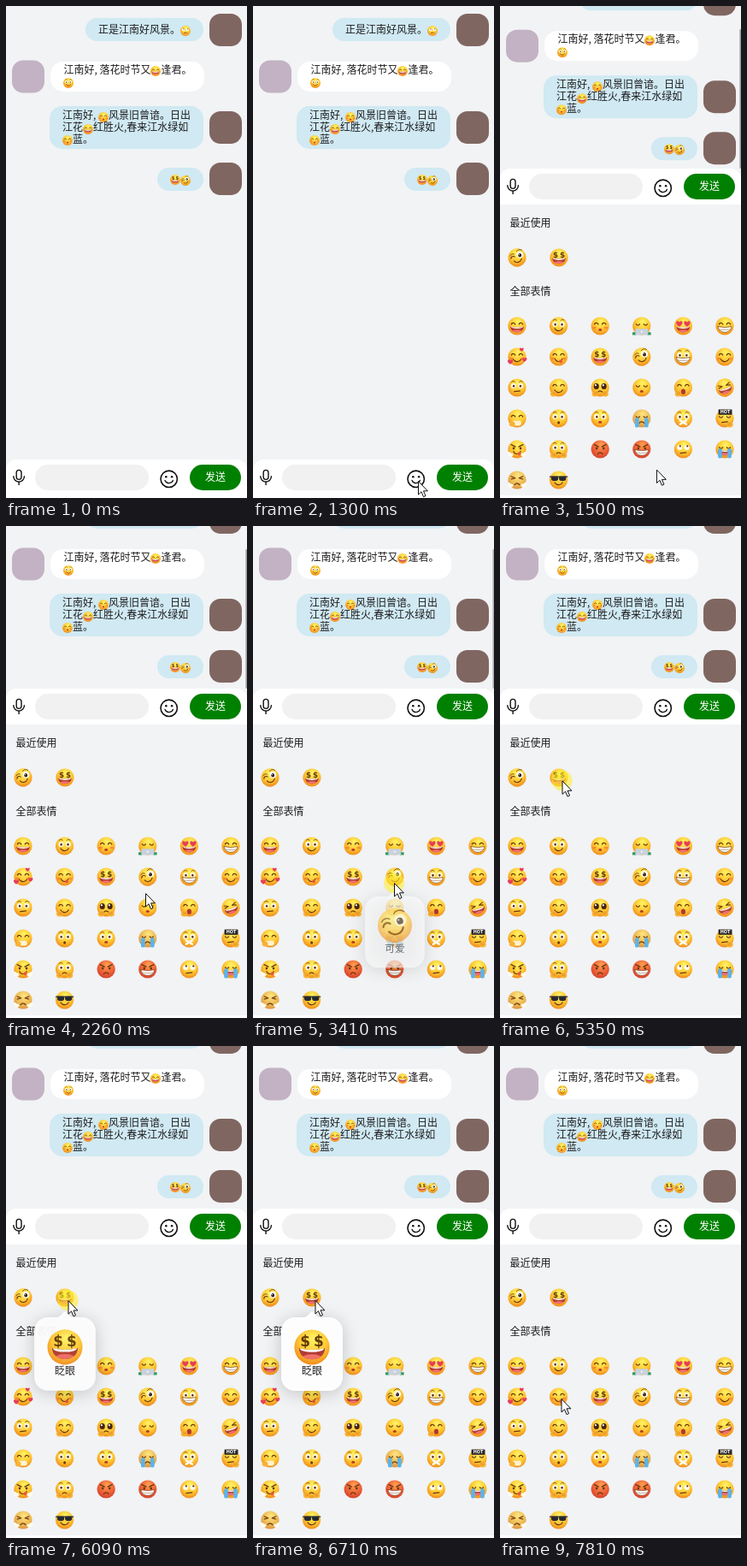
Recreate the animation shown at these times as an HTML page with a canvas. Size 282 by 575 pixels, loop 8 s.

```html
<!DOCTYPE html>
<html lang="zh-CN">
<head>
<meta charset="utf-8">
<title>Chat emoji panel</title>
<style>
html, body { margin: 0; width: 100%; height: 100%; overflow: hidden; background: #f1f3f5; }
canvas { display: block; width: 282px; height: 575px; }
</style>
</head>
<body>
<canvas id="stage"></canvas>
<script>
const W = 282, H = 575, LOOP = 8000, TAU = Math.PI * 2;
const FONT = '"Noto Sans CJK SC", "Noto Sans CJK", "Noto Sans", sans-serif';
const BG = '#f1f3f5', BLUE = '#d0e9f3', INK = '#69350f';
const canvas = document.getElementById('stage');
const ctx = canvas.getContext('2d');
const dpr = Math.max(1, window.devicePixelRatio || 1);
canvas.width = W * dpr;
canvas.height = H * dpr;

const clamp = v => Math.min(1, Math.max(0, v));
const ramp = (t, a, b) => clamp((t - a) / (b - a));
const smooth = p => p * p * (3 - 2 * p);
const easeOut = p => 1 - (1 - p) ** 3;

// ---------- primitives ----------
function box(x, y, w, h, r, fill) {
  ctx.beginPath();
  ctx.roundRect(x, y, w, h, r);
  ctx.fillStyle = fill;
  ctx.fill();
}
function oval(x, y, rx, ry, fill) {
  ctx.beginPath();
  ctx.ellipse(x, y, rx, ry, 0, 0, TAU);
  ctx.fillStyle = fill;
  ctx.fill();
}
function line(points, width, color = INK) {
  ctx.beginPath();
  points.forEach(([x, y]) => ctx.lineTo(x, y));
  ctx.lineWidth = width;
  ctx.strokeStyle = color;
  ctx.stroke();
}
function arc(x, y, r, from, to, width, color = INK) {
  ctx.beginPath();
  ctx.arc(x, y, r, from * Math.PI, to * Math.PI);
  ctx.lineWidth = width;
  ctx.strokeStyle = color;
  ctx.stroke();
}
function text(s, x, mid, color = '#1d1d1f', align = 'left') {
  ctx.font = '12px ' + FONT;
  ctx.textAlign = align;
  ctx.textBaseline = 'alphabetic';
  ctx.fillStyle = color;
  ctx.fillText(s, x, mid + 4);
}
function heart(x, y, s) {
  ctx.beginPath();
  ctx.moveTo(x, y + s);
  ctx.bezierCurveTo(x - s * 1.9, y - s * .2, x - s * .8, y - s * 1.5, x, y - s * .5);
  ctx.bezierCurveTo(x + s * .8, y - s * 1.5, x + s * 1.9, y - s * .2, x, y + s);
  ctx.fillStyle = '#e63e58';
  ctx.fill();
}
const both = draw => [-1, 1].forEach(draw);

// ---------- emoji, drawn in a unit circle ----------
const SKINS = {
  y: ['#fff060', '#fdc531', '#f08a1c'],
  r: ['#ff9a50', '#ec6238', '#d4442c'],
  p: ['#fbe27c', '#eebb55', '#dd9440']
};

const eyes = {
  o: () => both(s => oval(s * .36, -.2, .12, .17, INK)),
  O: () => both(s => {
    oval(s * .4, -.2, .27, .28, '#fff');
    oval(s * .37, -.17, .12, .14, INK);
    arc(s * .42, -.48, .24, 1.2, 1.8, .07);
  }),
  Q: () => both(s => {
    oval(s * .42, -.15, .29, .33, '#4a2410');
    oval(s * .42 - .08, -.27, .1, .1, '#fff');
  }),
  u: () => both(s => {
    oval(s * .4, -.2, .28, .28, '#fff');
    oval(s * .4 + .06, -.34, .11, .11, INK);
  }),
  '^': () => both(s => arc(s * .42, -.12, .22, 1.1, 1.9, .12)),
  x: () => both(s => line([[s * .65, -.4], [s * .22, -.22], [s * .65, -.1]], .11)),
  '-': () => both(s => arc(s * .42, -.32, .22, .15, .85, .11)),
  v: () => both(s => {
    line([[s * .65, -.5], [s * .18, -.28]], .13);
    oval(s * .38, -.1, .12, .14, INK);
  }),
  w: () => {
    arc(-.44, -.02, .25, 1.1, 1.8, .11);
    arc(-.42, -.22, .32, 1.2, 1.75, .07);
    oval(.4, -.2, .36, .36, '#fff');
    oval(.36, -.16, .19, .2, '#2c1a12');
    oval(.3, -.24, .06, .06, '#fff');
    arc(.42, -.38, .4, 1.25, 1.8, .07);
  },
  h: () => both(s => heart(s * .43, -.25, .33)),
  $: () => {
    ctx.font = 'bold .82px "DejaVu Sans", sans-serif';
    ctx.textAlign = 'center';
    ctx.fillStyle = '#633b08';
    both(s => ctx.fillText('$', s * .38, -.04));
  },
  g: () => {
    both(s => box(s * .43 - .39, -.4, .78, .5, [.1, .1, .28, .28], '#262a30'));
    line([[-.95, -.36], [.95, -.36]], .12, '#262a30');
  }
};

function openMouth(teethOnly) {
  ctx.beginPath();
  ctx.moveTo(-.74, .06);
  ctx.quadraticCurveTo(0, .24, .74, .06);
  ctx.bezierCurveTo(.7, .9, -.7, .9, -.74, .06);
  ctx.fillStyle = teethOnly ? '#fff' : '#b23c34';
  ctx.fill();
  if (teethOnly) {
    ctx.lineWidth = .06;
    ctx.strokeStyle = INK;
    ctx.stroke();
    line([[-.6, .38], [0, .43], [.6, .38]], .04);
  } else {
    ctx.save();
    ctx.clip();
    oval(0, .08, .68, .2, '#fff');
    oval(0, .64, .58, .24, '#f0706a');
    ctx.restore();
  }
}
const mouths = {
  s: () => arc(0, .05, .48, .14, .86, .11),
  D: () => openMouth(false),
  T: () => openMouth(true),
  k: () => { oval(0, .42, .2, .15, '#d64a32'); line([[-.13, .42], [.13, .42]], .05); },
  f: () => arc(0, .7, .32, 1.18, 1.82, .11),
  l: () => line([[-.32, .43], [.32, .36]], .11),
  r: () => oval(0, .44, .25, .3, '#b2382c'),
  o: () => oval(0, .46, .14, .15, INK),
  t: () => { arc(0, .1, .42, .1, .9, .11); oval(.24, .5, .18, .2, '#ee5440'); },
  c: () => {
    line([[-.34, .22], [.34, .64]], .22, '#fff');
    line([[.34, .22], [-.34, .64]], .22, '#fff');
  },
  n: () => {}
};
const hand = s => {
  oval(s * .55, .68, .36, .3, '#f9b234');
  [0, .16].forEach(d => line([[s * .32, .58 + d], [s * .66, .53 + d]], .05, '#cf7c1c'));
};
const extras = {
  b: () => both(s => oval(s * .62, .2, .22, .14, 'rgba(244,84,50,.5)')),
  H: () => { heart(-.75, .55, .28); heart(.82, .3, .25); heart(.5, -.8, .22); extras.b(); },
  m: () => hand(-1),
  M: () => both(hand),
  W: () => both(s => box(s * .52 - .22, -.08, .44, 1.06, .15, '#5cb4ea')),
  t: () => { box(-.55, .25, 1, .55, .2, '#fff3d0'); oval(-.55, .62, .32, .28, '#f9b234'); },
  e: () => both(s => { oval(s * .7, .6, .27, .2, '#fffbe9'); oval(s * .9, .42, .16, .14, '#fffbe9'); }),
  P: () => {
    both(s => box(s * .8 - .22, .68, .44, .32, .06, '#2f9a5c'));
    box(-.7, .3, 1.4, .7, .1, '#c9d2dc');
    oval(0, .62, .1, .1, '#f7f9fa');
  },
  S: () => {
    box(-.7, -1, 1.5, .6, .06, '#2c2929');
    ctx.font = 'bold .46px "DejaVu Sans", sans-serif';
    ctx.textAlign = 'center';
    ctx.fillStyle = '#fff';
    ctx.fillText('HOT', .05, -.54);
    hand(1);
  }
};

// kind: skin, eyes, mouth, then any extras (R tilts the face)
function face(x, y, r, kind) {
  const [skin, eye, mouth, ...more] = kind;
  ctx.save();
  ctx.translate(x, y);
  ctx.scale(r, r);
  if (more.includes('R')) ctx.rotate(-.3);
  ctx.lineCap = ctx.lineJoin = 'round';
  const g = ctx.createRadialGradient(.1, -.5, .1, .05, -.25, 1.27);
  SKINS[skin].forEach((c, i) => g.addColorStop([0, .6, 1][i], c));
  oval(0, 0, 1, 1, g);
  eyes[eye]();
  mouths[mouth]();
  more.forEach(m => extras[m] && extras[m]());
  ctx.restore();
}

// ---------- scene ----------
const LAUGH = 'y^D', SMILE = 'yOs', KISS = 'y^kb', RICH = 'y$D', WINK = 'ywsR';
const GRID = [
  LAUGH, SMILE, KISS, 'y-nP', 'yhD', 'y^T',
  'y^sH', 'y^tb', RICH, WINK, 'yOT', 'y^sb',
  'yOl', 'y^sm', 'yQfM', 'y-k', 'y^rm', 'yxDR',
  'y^nt', 'yOo', 'yOk', 'p-fW', 'yOc', 'y-lS',
  'yvte', 'yOfM', 'rvf', 'rvT', 'yul', 'y-DW',
  'pxfe', 'ygs'
];

const avatar = (x, y, color) => box(x, y, 38, 38, 13, color);
const mine = y => avatar(238, y, '#806661');

function chat(shift) {
  ctx.save();
  ctx.translate(0, -shift);
  box(93, 14, 138, 27, 13.5, BLUE);
  text('正是江南好风景。', 108, 28);
  face(210, 29, 6, 'yul');
  mine(9);

  avatar(7, 63.5, '#c3b2c3');
  box(52, 65, 180, 35, 15, '#fff');
  text('江南好, 落花时节又', 67.5, 75);
  face(175, 76, 6, LAUGH);
  text('逢君。', 181.5, 75);
  face(73, 90, 6, SMILE);

  box(51, 117, 180, 50, 15, BLUE);
  text('江南好, ', 66, 128);
  face(114, 130, 6, KISS);
  text('风景旧曾谙。日出', 120, 128);
  text('江花', 66, 142);
  face(96, 144, 6, LAUGH);
  text('红胜火,春来江水绿如', 102, 142);
  face(72, 157, 6, KISS);
  text('蓝。', 78, 156);
  mine(123);

  box(177, 189, 54, 27, 13.5, BLUE);
  face(198, 203, 6, RICH);
  face(210, 204, 6, WINK);
  mine(183);
  ctx.restore();
}

function inputBar(y) {
  const black = '#111';
  ctx.save();
  ctx.translate(0, y);
  ctx.lineCap = 'round';
  box(0, 0, W, 42, [12, 12, 0, 0], '#fff');
  ctx.beginPath();
  ctx.roundRect(12.2, 12.4, 5.8, 11, 2.9);
  ctx.lineWidth = 1.4;
  ctx.strokeStyle = black;
  ctx.stroke();
  arc(15.1, 19.8, 6.3, 0, 1, 1.4, black);
  line([[15.1, 26.2], [15.1, 29.4]], 1.4, black);
  box(34, 6, 133, 30, 15, '#f1f1f1');
  arc(190.7, 22.8, 9.7, 0, 2, 1.6, black);
  both(s => oval(190.7 + s * 3.4, 20.2, 1.3, 1.3, black));
  arc(190.7, 22.6, 5, .12, .88, 1.4, black);
  box(215, 6, 60, 30, 15, '#008000');
  text('发送', 245, 21, '#fff', 'center');
  ctx.restore();
}

function panel() {
  text('最近使用', 11.5, 254);
  face(20, 294, 10.6, WINK);
  face(69, 294, 10.6, RICH);
  text('全部表情', 11.5, 334);
  GRID.forEach((kind, i) =>
    face(20 + (i % 6) * 48.6, 374 + Math.floor(i / 6) * 36, 10.6, kind));
}

function popup(cx, top, kind, label, show) {
  if (show <= 0) return;
  const scale = .92 + .08 * show;
  ctx.save();
  ctx.globalAlpha = show;
  ctx.translate(cx, top - 7);
  ctx.scale(scale, scale);
  ctx.translate(0, 7);
  ctx.beginPath();
  ctx.moveTo(-12, 1);
  ctx.quadraticCurveTo(-6, 0, -2, -5.5);
  ctx.quadraticCurveTo(0, -7.5, 2, -5.5);
  ctx.quadraticCurveTo(6, 0, 12, 1);
  ctx.closePath();
  ctx.roundRect(-36, 0, 72, 86, 16);
  ctx.shadowColor = 'rgba(0,0,0,.2)';
  ctx.shadowBlur = 20 * dpr;
  ctx.shadowOffsetY = 3 * dpr;
  ctx.fillStyle = '#fdfdfd';
  ctx.fill();
  ctx.shadowColor = 'transparent';
  face(0, 35, 20.6, kind);
  text(label, 0, 63, '#1d1d1f', 'center');
  ctx.restore();
}

// time, tip x, tip y
const PATH = [
  [320, 212, 577], [880, 193, 555], [1420, 193, 555], [1570, 175, 531],
  [1720, 175, 531], [2260, 163, 429], [2470, 165, 417], [4450, 165, 417],
  [5150, 73, 299], [5350, 72.5, 297.5], [6740, 72.5, 297], [7470, 73, 413],
  [7810, 71.5, 412]
];
// spans during which the button is held down
const PRESSES = [[1230, 1300], [2740, 3700], [5220, 6160]];

function cursor(t) {
  if (t < 320) return;
  let i = PATH.length - 1;
  while (i > 0 && PATH[i][0] > t) i--;
  const a = PATH[i], b = PATH[i + 1] || a;
  const p = a === b ? 0 : smooth(ramp(t, a[0], b[0]));
  ctx.save();
  ctx.translate(a[1] + (b[1] - a[1]) * p, a[2] + (b[2] - a[2]) * p);
  if (PRESSES.some(([from, to]) => t >= from && t < to)) {
    oval(0, 0, 12, 12, 'rgba(255,238,50,.6)');
  }
  ctx.beginPath();
  [[.5, .5], [.5, 16], [4, 12.7], [6.5, 18.6], [9, 17.5], [6.5, 11.8], [11.4, 11.8]]
    .forEach(([x, y]) => ctx.lineTo(x, y));
  ctx.closePath();
  ctx.fillStyle = '#fff';
  ctx.fill();
  ctx.lineWidth = 1;
  ctx.strokeStyle = '#111';
  ctx.stroke();
  ctx.restore();
}

function draw(t) {
  const open = t >= 1420;
  ctx.setTransform(dpr, 0, 0, dpr, 0, 0);
  ctx.globalAlpha = 1;
  ctx.fillStyle = BG;
  ctx.fillRect(0, 0, W, H);
  chat(38 * easeOut(ramp(t, 1390, 1570)));
  if (open) {
    ctx.globalAlpha = 1 - ramp(t, 3340, 3700);
    box(280.4, 27, 1.6, 163, .8, '#9a9c9e');
    ctx.globalAlpha = 1;
    ctx.fillStyle = BG;
    ctx.fillRect(0, 190, W, H - 190);
  }
  inputBar(open ? 190 : 530);
  ctx.fillStyle = '#fff';
  ctx.fillRect(0, 572, W, 3);
  if (open) {
    panel();
    popup(166, 433, WINK, '可爱', easeOut(ramp(t, 3300, 3700)) * (1 - ramp(t, 4440, 4700)));
    popup(69, 317, RICH, '眨眼', easeOut(ramp(t, 5830, 6230)) * (1 - ramp(t, 6770, 7030)));
  }
  cursor(t);
}

const start = performance.now();
function tick() {
  draw((performance.now() - start) % LOOP);
  requestAnimationFrame(tick);
}
tick();
</script>
</body>
</html>
```
